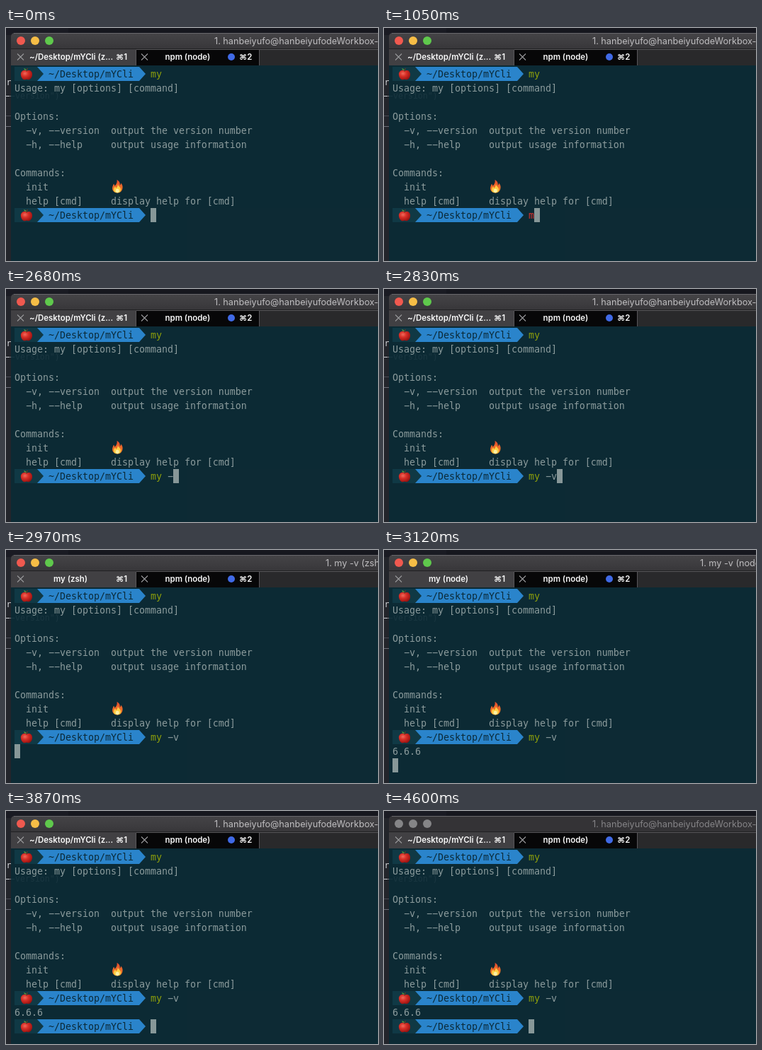
These frames come from a looping animation (525x330 px, 4700 ms). An HTML page:

```html
<!DOCTYPE html>
<html lang="en">
<head>
<meta charset="utf-8">
<title>Terminal session</title>
<style>
  html, body { margin: 0; width: 100%; height: 100%; overflow: hidden; background: #17181f; }
  svg { display: block; width: 525px; height: 330px; }
  text { white-space: pre; }
  .mono { font: 13.29px "DejaVu Sans Mono", "Noto Sans Mono", monospace; fill: #8b9b9c; }
  .path { fill: #0b2a38; }
  .behind { font: 11.6px "DejaVu Sans Mono", monospace; fill: #d4d6da; }
  .title { font: 12.66px Inter, "Liberation Sans", sans-serif; fill: #bfbec0; }
  .tab { font: 600 11.45px Inter, "Liberation Sans", "DejaVu Sans", sans-serif; fill: #f8f8f8; }
  .close { stroke: #98989a; stroke-width: 1.1; fill: none; }
</style>
</head>
<body>
<svg viewBox="0 0 525 330">
  <defs>
    <linearGradient id="bar" x1="0" y1="0" x2="0" y2="1">
      <stop offset="0" stop-color="#454447"/>
      <stop offset="1" stop-color="#373639"/>
    </linearGradient>
    <linearGradient id="flameFill" x1="0" y1="0" x2="0" y2="1">
      <stop offset="0" stop-color="#e2492f"/>
      <stop offset="1" stop-color="#f58a24"/>
    </linearGradient>
    <radialGradient id="skin" cx=".36" cy=".34" r=".72">
      <stop offset="0" stop-color="#ef6a5c"/>
      <stop offset=".4" stop-color="#d93028"/>
      <stop offset="1" stop-color="#96100f"/>
    </radialGradient>

    <g id="apple">
      <path d="M8.500 5C7 3.800 6 3.700 4.800 4 1.600 4.500.3 7.200.4 10 .6 13.600 3 17.300 5.800 17.300 7 17.300 7.600 16.700 8.600 16.700S10.200 17.300 11.300 17.300C14.200 17.300 16.600 13.400 16.600 9.800 16.600 6.700 14.800 4 12 4 10.400 4 9.500 4.300 8.500 5Z" fill="url(#skin)"/>
      <path d="M8.500 5.500Q8.600 3 9.800 1" fill="none" stroke="#6b3f20" stroke-width="1.200"/>
      <path d="M8.300 3.700Q7.800 1 4.600 1.200 5.200 3.900 8.300 3.700Z" fill="#5f9e3a"/>
    </g>

    <g id="prompt">
      <rect width="32" height="20" fill="#103945"/>
      <path d="M32 0H176L185 10 176 20H32Z" fill="#2a84cb"/>
      <path d="M32 0 41 10 32 20Z" fill="#103945"/>
      <use href="#apple" x="8.500" y="1"/>
      <text class="mono path" x="48" y="15">~/Desktop/mYCli</text>
    </g>

    <path id="x" class="close" d="M-4.500-4.500 4.500 4.500M4.500-4.500-4.500 4.500"/>
  </defs>

  <!-- Window behind -->
  <rect width="525" height="330" fill="#23252b"/>
  <rect width="525" height="10" fill="#16171e"/>
  <rect width="88" height="10" fill="#1a1b23"/>
  <path d="M0 124.500H7" stroke="#4a4b55"/>
  <path d="M0 139.500H7" stroke="#6d6e78"/>
  <text class="behind" x="-6.500" y="81">ar</text>
  <text class="behind" x="-1" y="100">−−version")</text>

  <!-- Title bar and tabs -->
  <path id="frame" d="M7 31V12.500Q7 7 12.500 7H525V31Z"/>
  <path d="M11 7.500H525" stroke="#69686c"/>
  <g id="lights"></g>
  <text id="title" class="title" y="23"></text>
  <rect x="7" y="30" width="518" height="23" fill="#29292b"/>
  <rect x="7" y="30" width="176" height="23" fill="#414043"/>
  <rect x="183" y="30" width="174" height="23" fill="#070708"/>
  <path d="M7 29.500H525" stroke="#202022"/>
  <path d="M183.500 53V30.500H525M357.500 30V53" fill="none" stroke="#58575a"/>
  <use href="#x" x="20.500" y="41"/>
  <use href="#x" x="195.500" y="41"/>
  <text id="tab" class="tab" y="45"></text>
  <text class="tab" x="155" y="45">⌘1</text>
  <text class="tab" x="224.500" y="45">npm (node)</text>
  <circle cx="318" cy="41" r="5" fill="#406ae6"/>
  <text class="tab" x="329" y="45">⌘2</text>

  <!-- Terminal, slightly see-through -->
  <rect x="7" y="53" width="518" height="277" fill="#0b2a35" fill-opacity=".93"/>
  <g id="screen"></g>
  <use href="#prompt" x="12" y="255"/>
  <text id="command" class="mono" x="204" y="270"></text>
  <text id="args" class="mono" x="228" y="270"></text>
  <text id="output" class="mono" x="12" y="290"></text>
  <use id="next" href="#prompt" x="12" y="295"/>
  <rect id="cursor" width="8" height="20" fill="#879798"/>
  <g transform="translate(149 215)">
    <path d="M7.500 0C11.500 2 12 5 11.700 7.500 13 6.800 13.200 5.500 13.100 4.500 16 7.500 16 11 15 13.700 14 16.800 11.600 18.500 8.200 18.500 3.800 18.500 1 15.600 1.100 11.800 1.200 9 2.300 7.600 3 5.800 4 6.800 4.300 7.800 4.400 8.700 6.800 6.500 8.400 3.500 7.500 0Z" fill="url(#flameFill)"/>
    <path d="M8.700 6C9 9 13.200 10.500 13 14 12.800 17 10.800 18.300 8.200 18.300 5.200 18.300 3 16.700 3.100 14 3.200 12 4.200 11 4.700 9.800 5.700 10.400 6.100 11 6.300 12 8 10.500 9 8.500 8.700 6Z" fill="#fdcf45"/>
    <ellipse cx="8.200" cy="15.500" rx="2.500" ry="2.800" fill="#fff0a4"/>
  </g>
</svg>

<script>
const LOOP = 4700;
const CELL = 8, ROW = 20, LEFT = 12, TOP = 55;
const RED = '#dc322f', GREEN = '#8d9f0c';
const $ = id => document.getElementById(id);
const wideDash = text => text.replace(/-/g, '−');

function add(parent, tag, attrs, text = '') {
  const node = document.createElementNS('http://www.w3.org/2000/svg', tag);
  for (const key in attrs) node.setAttribute(key, attrs[key]);
  node.textContent = text;
  parent.append(node);
  return node;
}

// Fixed lines; a row number places each one on the grid.
add($('screen'), 'use', { href: '#prompt', x: LEFT, y: TOP });
add($('screen'), 'text', { class: 'mono', x: 204, y: TOP + 15, style: 'fill:' + GREEN }, 'my');
const lines = [
  'Usage: my [options] [command]',
  '',
  'Options:',
  '  -v, --version  output the version number',
  '  -h, --help     output usage information',
  '',
  'Commands:',
  '  init',
  '  help [cmd]     display help for [cmd]'
];
lines.forEach((line, i) =>
  add($('screen'), 'text', { class: 'mono', x: LEFT, y: TOP + 15 + (i + 1) * ROW }, wideDash(line)));

const lights = ['#f0594f', '#f6bd46', '#5fc94c'].map((color, i) =>
  [add($('lights'), 'circle', { cx: 21 + 20 * i, cy: 18, r: 6 }), color]);

const host = '1. hanbeiyufo@hanbeiyufodeWorkbox-2: ~/Desktop/mYCli';
const shell = { title: host, titleX: 294, tab: '~/Desktop/mYCli (z...', tabX: 33 };
const node = { title: host, titleX: 289, tab: '~/Desktop/mYCli (n...', tabX: 33 };
const runZsh = { title: '1. my -v (zsh)', titleX: 451, tab: 'my (zsh)', tabX: 67 };
const runNode = { title: '1. my -v (node)', titleX: 446, tab: 'my (node)', tabX: 63 };

// Each step changes only the fields it names; cursor is [column, row].
const steps = [
  [0, { ...shell, command: '', color: RED, args: '', output: '', next: false, active: true, cursor: [24, 10] }],
  [1050, { command: 'm', cursor: [25, 10] }],
  [1190, { command: 'my', color: GREEN, cursor: [26, 10] }],
  [1640, { cursor: [27, 10] }],
  [2680, { args: wideDash('-'), cursor: [28, 10] }],
  [2830, { args: wideDash('-v'), cursor: [29, 10] }],
  [2970, { ...runZsh, cursor: [0, 11] }],
  [3120, { ...runNode, output: '6.6.6', cursor: [0, 12] }],
  [3270, { ...node, next: true, cursor: [24, 12] }],
  [3870, shell],
  [4600, { active: false }]
];

function stateAt(time) {
  const past = steps.filter(([start]) => start <= time);
  return Object.assign({}, ...past.map(([, change]) => change));
}

function draw(time) {
  const s = stateAt(time);
  for (const id of ['title', 'tab', 'command', 'args', 'output']) $(id).textContent = s[id];
  $('title').setAttribute('x', s.titleX);
  $('title').style.fill = s.active ? '#bfbec0' : '#858487';
  $('tab').setAttribute('x', s.tabX);
  $('command').style.fill = s.color;
  $('next').style.display = s.next ? '' : 'none';
  $('frame').setAttribute('fill', s.active ? 'url(#bar)' : '#343336');
  lights.forEach(([dot, color]) => dot.setAttribute('fill', s.active ? color : '#858587'));
  $('cursor').setAttribute('x', LEFT + s.cursor[0] * CELL);
  $('cursor').setAttribute('y', TOP + s.cursor[1] * ROW);
}

const begin = performance.now();
function tick() {
  draw((performance.now() - begin) % LOOP);
  requestAnimationFrame(tick);
}
tick();
</script>
</body>
</html>
```
